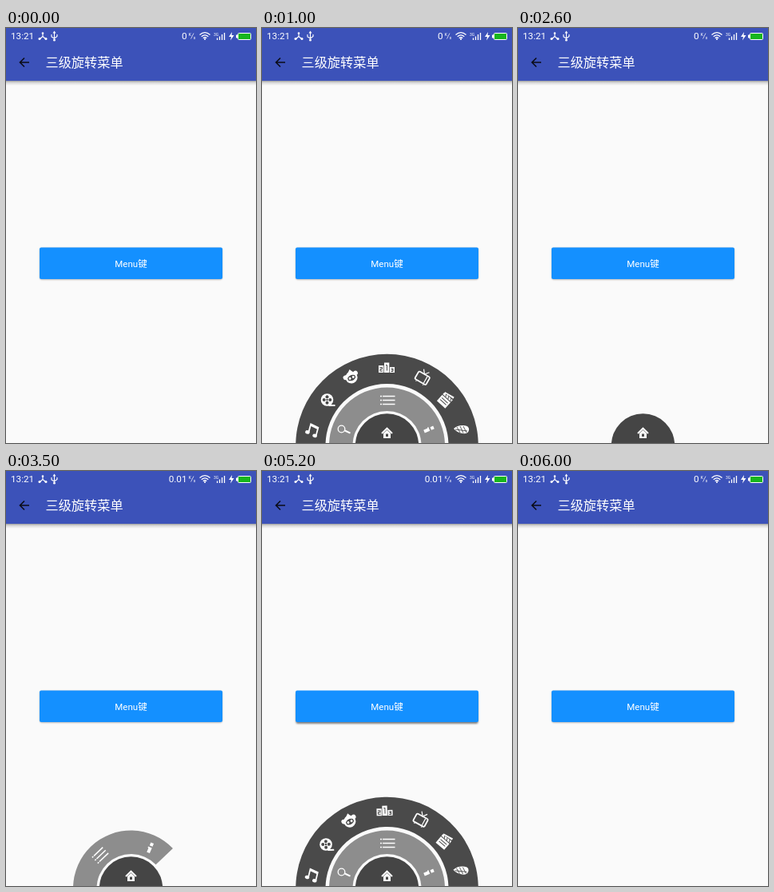
Animation, 313 px wide and 519 px high, one loop 6.6 s. Source, as an HTML page:

```html
<!DOCTYPE html>
<html lang="zh">
<head>
<meta charset="utf-8">
<title>三级旋转菜单</title>
<style>
html, body { margin: 0; height: 100%; overflow: hidden; background: #fafafa; }
svg { display: block; width: 100vw; height: 100vh; }
text { font-family: Roboto, "Noto Sans CJK SC", "Noto Sans CJK", sans-serif; fill: #fff; }
.line { fill: none; stroke: #fff; }
.dark { fill: #4a4a4a; }
</style>
</head>
<body>
<svg viewBox="0 0 313 519">
  <defs>
    <linearGradient id="fade" x2="0" y2="1">
      <stop stop-color="#000" stop-opacity=".36"/>
      <stop offset=".4" stop-color="#000" stop-opacity=".13"/>
      <stop offset="1" stop-color="#000" stop-opacity="0"/>
    </linearGradient>
    <filter id="soft" x="-5%" y="-20%" width="110%" height="140%"><feGaussianBlur stdDeviation="1"/></filter>
  </defs>
  <rect width="313" height="519" fill="#fafafa"/>
  <rect y="66" width="313" height="6" fill="url(#fade)"/>
  <rect width="313" height="66" fill="#3c52b9"/>

  <!-- status bar -->
  <text x="6" y="14.2" font-size="11.7">13:21</text>
  <g class="line" stroke-width="1.1">
    <path d="M46 6V10.5L42 14M46 10.5L50 14"/>
    <path d="M60.500 5V15M57 8V11L60.500 13L64 10.500V8"/>
  </g>
  <g fill="#fff">
    <circle cx="46" cy="6.500" r="1.300"/><circle cx="42" cy="13.500" r="1.500"/><circle cx="50" cy="13.500" r="1.500"/>
    <path d="M60.500 3.500L62.500 6.500H58.500Z"/><circle cx="60.500" cy="15" r="1.500"/>
    <path d="M283 5L279 11H282L281 15.500L285.500 9H282.500Z"/>
  </g>
  <text id="speed" x="226.500" y="14.200" font-size="11.700" text-anchor="end"></text>
  <text x="228.500" y="10" font-size="5.500">K</text>
  <text x="234.500" y="13.800" font-size="5.500">s</text>
  <path class="line" stroke-width=".7" d="M231.500 13.500L235 6.500"/>
  <g class="line" stroke-width="1.300">
    <path d="M242.500 8.500Q249 2.800 255.500 8.500M244.700 10.700Q249 7 253.300 10.700M246.800 12.700Q249 10.800 251.200 12.700"/>
    <path d="M264.500 12.500V15M267.500 10.500V15M270.500 8V15M273.500 6V15"/>
  </g>
  <circle cx="249" cy="14" r="1.100" fill="#fff"/>
  <path id="traffic" d="M251 12H256L253.500 15.500Z" fill="#fff"/>
  <text x="260" y="9.500" font-size="5">3G</text>
  <rect x="290.500" y="6.500" width="16" height="8" rx="1" fill="#17b51d" stroke="#fff"/>
  <rect x="288" y="8.500" width="2" height="4" fill="#fff"/>

  <!-- toolbar -->
  <path d="M29 43H18M23 37.500L17.500 43L23 48.500" fill="none" stroke="#0b0d18" stroke-width="1.600"/>
  <text x="49.500" y="49" font-size="16.200">三级旋转菜单</text>

  <!-- button -->
  <rect id="shade" x="42.500" y="275.500" width="228" height="39" rx="2" filter="url(#soft)"/>
  <rect x="42" y="274.500" width="229" height="39.500" rx="2" fill="#1490ff"/>
  <text x="156.500" y="298.500" font-size="11.500" text-anchor="middle">Menu键</text>

  <g id="menu" transform="translate(156.500 522)"></g>
</svg>
<script>
const LOOP = 6600, SPIN = 500;
const $ = id => document.getElementById(id);

// Icons are drawn around their own middle.
const icons = {
  home: `<path class="line" stroke-width="2" d="M-6.500 .5L0 -5.800L6.500 .5"/>
    <path fill="#fff" d="M-4.500 .5L0 -3.800L4.500 .5V6.500H-4.500Z"/><path class="dark" d="M-1.500 1H1.500V4.500H-1.500Z"/>`,
  search: `<circle class="line" cx="-3.500" cy="-1" r="4.300" stroke-width="1.300"/>
    <path class="line" stroke-width="2" d="M.8 1L7.500 4.200"/>`,
  list: `<path class="line" stroke-width="1.500" d="M-9 -5H-7M-6 -5H9.500M-9 0H-7M-6 0H9.500M-9 5H-7M-6 5H9.500"/>`,
  info: `<path fill="#fff" d="M-2 -6.500H2V-2.500H-2ZM-3 -.5H2V6.500H-2V1H-3Z"/>`,
  music: `<path class="line" stroke-width="1.800" d="M-4 5V-6L6 -4V7M-4 -4.500L6 -2.500"/>
    <ellipse cx="-5.500" cy="5" rx="2.800" ry="2.200" fill="#fff"/><ellipse cx="4.500" cy="7" rx="2.800" ry="2.200" fill="#fff"/>`,
  reel: `<circle r="7.800" fill="#fff"/><path class="line" stroke-width="2" d="M2 7H10"/>
    <g class="dark"><circle r="1.200"/><circle cx="-3.800" r="2"/><circle cx="3.800" r="2"/><circle cy="-3.800" r="2"/><circle cy="3.800" r="2"/></g>`,
  face: `<circle r="7.500" fill="#fff"/><circle cx="-7" cy="-3" r="2.800" fill="#fff"/><circle cx="7" cy="-3" r="2.800" fill="#fff"/>
    <path fill="#fff" d="M-3 -6L2 -10L4 -6Z"/><path class="dark" d="M-5 -1Q0 -5 5 -1V2Q0 6 -5 2Z"/>
    <circle cx="-2.300" cy=".5" r="1.500" fill="#fff"/><circle cx="2.300" cy=".5" r="1.500" fill="#fff"/>`,
  podium: `<path fill="#fff" d="M-10 -3H-3.700V6H-10ZM-3 -6.500H3.300V6H-3ZM4 -1H10V6H4Z"/>
    <path fill="none" stroke="#4a4a4a" d="M-8.500 -.5H-5.500V1.500H-8V4H-5M-1 -3.500H.5V3.500M5.500 1H8V4.500H5.500M6 2.700H8"/>`,
  tv: `<rect class="line" x="-8" y="-4" width="16" height="11" rx="1.500" stroke-width="1.800"/>
    <path class="line" stroke-width="1.200" d="M-4 -9L0 -4L4 -9M4.500 -3V6M-5 8V9M5 8V9"/>`,
  clapper: `<path fill="#fff" d="M-7 -2H7V8H-7ZM-7 -6H7V-3H-7ZM-7 -7L6 -10L6.500 -7.500L-6 -6Z"/>
    <path stroke="#4a4a4a" d="M-4 -6L-2 -3M0 -6L2 -3M4 -6L6 -3M-5 1H5M-5 4H5"/>`,
  shell: `<path fill="#fff" d="M-10 -1Q-5 -5.500 2 -5Q10 -4.500 9 1Q8 6 1 5Q-6 4 -10 -1Z"/>
    <path fill="none" stroke="#4a4a4a" stroke-width=".9" d="M-6 -3L-2 4M-2 -4L2 4.500M2 -4L6 4M-8 0L7 2"/>`
};

// turns: start times, alternately opening and closing; icons: [name, x, y, tilt]
const rings = [
  { outer: 39.7, inner: 0, color: "#454545", turns: [105, 5550],
    icons: [["home", 0, -15.5, 0]] },
  { outer: 72.5, inner: 43, color: "#8d8d8d", turns: [305, 2085, 3165, 5365],
    icons: [["search", -53.5, -19.5, 0], ["list", .5, -56.5, 0], ["info", 52.5, -20, 67]] },
  { outer: 114.3, inner: 77, color: "#4a4a4a", turns: [495, 1385, 3880, 5172],
    icons: [["music", -93, -20, 15], ["reel", -75, -57, 0], ["face", -44.5, -85, -25], ["podium", -.5, -97, 0],
      ["tv", 45, -85.5, 30], ["clapper", 73, -57, 42], ["shell", 93.5, -20, 0]] }
];

for (const ring of rings) {
  const { outer: R, inner: r, color } = ring;
  const g = ring.el = document.createElementNS("http://www.w3.org/2000/svg", "g");
  g.innerHTML = `<path fill="${color}" d="M${-R} 0A${R} ${R} 0 0 1 ${R} 0H${r}A${r} ${r} 0 0 0 ${-r} 0Z"/>` +
    ring.icons.map(([name, x, y, tilt]) =>
      `<g transform="translate(${x} ${y}) rotate(${tilt})">${icons[name]}</g>`).join("");
  $("menu").append(g);
}

const ease = u => .5 - .5 * Math.cos(Math.PI * Math.min(1, Math.max(0, u)));
const within = (t, a, b) => t >= a && t < b;

function draw(now) {
  const t = now % LOOP;
  for (const { el, turns } of rings) {
    const open = turns.reduce((sum, start, i) => sum + (i % 2 ? -1 : 1) * ease((t - start) / SPIN), 0);
    el.setAttribute("transform", `rotate(${180 * (open - 1)})`);
    el.setAttribute("visibility", open > .001 ? "visible" : "hidden");
  }
  $("speed").textContent = within(t, 3100, 5500) ? "0.01" : "0";
  $("traffic").setAttribute("visibility", within(t, 1600, 2300) ? "visible" : "hidden");
  const pressed = within(t, 5150, 5400);
  $("shade").setAttribute("y", pressed ? 277 : 275.5);
  $("shade").setAttribute("opacity", pressed ? .5 : .38);
  requestAnimationFrame(draw);
}
requestAnimationFrame(draw);
</script>
</body>
</html>
```
